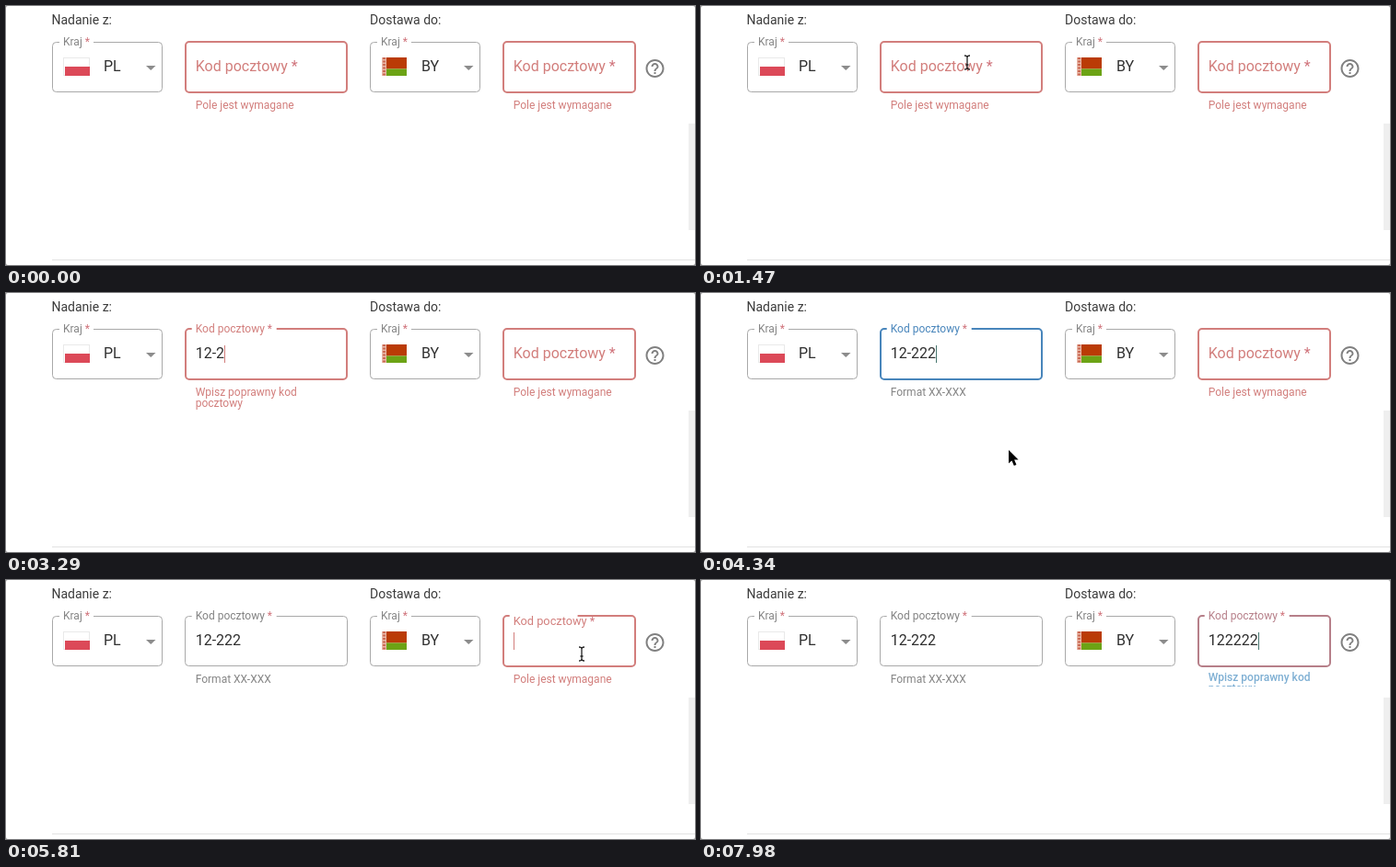
An HTML page for the animation above (8000 ms loop, 748 by 282 pixels).

```html
<!DOCTYPE html>
<html lang="pl">
<head>
<meta charset="utf-8">
<title>Kod pocztowy</title>
<style>
html, body { margin: 0; width: 100%; height: 100%; overflow: hidden; background: #999; }
svg { display: block; width: 748px; height: 282px; }
text { font-family: Roboto, Arial, sans-serif; white-space: pre; }
.heading { font-size: 14px; fill: #3c3c3c; }
.value { font-size: 16px; fill: #303030; }
.small { font-size: 12px; fill: #858585; }
.star { fill: #d0747c; }
.line { fill: none; stroke: #a9a9a9; }
</style>
</head>
<body>
<svg id="stage" viewBox="0 0 748 282">
  <defs><clipPath id="messageClip"><rect x="540" y="98" width="180" height="18"/></clipPath></defs>
  <rect width="748" height="282" rx="2" fill="#fff"/>
  <rect x="741" y="128" width="7" height="116" fill="#efefef"/>
  <rect x="50" y="276" width="698" height="1" fill="#e2e2e2"/>
  <text class="heading" x="49.5" y="20">Nadanie z:</text>
  <text class="heading" x="395" y="20">Dostawa do:</text>
  <g>
    <rect x="62.5" y="56.5" width="28" height="19" fill="#fff" stroke="#e9e9e9"/>
    <rect x="64" y="66" width="27" height="10" fill="#dc4958"/>
  </g>
  <g>
    <rect x="408" y="56" width="27" height="12.500" fill="#ba3b06"/>
    <rect x="408" y="68.500" width="27" height="7.500" fill="#6ca315"/>
    <rect x="408" y="56" width="5" height="20" fill="#e9b9a9"/>
    <path d="M410.500 56V76" stroke="#cb6a55" stroke-width="3" stroke-dasharray="2 1.500"/>
  </g>
  <path transform="translate(692.5 56)" fill="#808080" d="M11 18h2v-2h-2v2zm1-16C6.480 2 2 6.480 2 12s4.480 10 10 10 10-4.480 10-10S17.520 2 12 2zm0 18c-4.410 0-8-3.590-8-8s3.590-8 8-8 8 3.590 8 8-3.590 8-8 8zm0-14c-2.210 0-4 1.790-4 4h2c0-1.100.900-2 2-2s2 .900 2 2c0 2-3 1.750-3 5h2c0-2.250 3-2.500 3-5 0-2.210-1.790-4-4-4z"/>
</svg>
<script>
const LOOP = 8000;
const RED = [210, 126, 124], BLUE = [72, 133, 187], GRAY = [169, 169, 169], LABEL = [130, 130, 130];
const REQUIRED = ['Pole jest wymagane'];
const INVALID = ['Wpisz poprawny kod', 'pocztowy'];
const stage = document.getElementById('stage');

function add(tag, attrs = {}, parent = stage, content = '') {
  const node = document.createElementNS('http://www.w3.org/2000/svg', tag);
  set(node, attrs);
  node.textContent = content;
  parent.append(node);
  return node;
}
function set(node, attrs) {
  for (const key in attrs) node.setAttribute(key, attrs[key]);
}
const clamp = v => Math.min(1, Math.max(0, v));
const lerp = (a, b, p) => a + (b - a) * p;
const progress = (t, start, length) => clamp((t - start) / length);
const mix = (a, b, p) => a.map((v, i) => lerp(v, b[i], p));
const rgb = c => `rgb(${c.map(Math.round)})`;

// cubic-bezier(.25, .8, .25, 1)
function swift(x) {
  let lo = 0, hi = 1;
  for (let i = 0; i < 20; i++) {
    const u = (lo + hi) / 2;
    if (.75 * u * (1 - u) + u ** 3 < x) lo = u; else hi = u;
  }
  return 2.4 * lo * (1 - lo) ** 2 + 3 * lo * lo * (1 - lo) + lo ** 3;
}

// Rounded box whose top edge is open between x = from and x = to
function outline(l, t, r, b, from, to) {
  return `M${to} ${t}H${r - 4}a4 4 0 0 1 4 4V${b - 4}a4 4 0 0 1-4 4H${l + 4}` +
    `a4 4 0 0 1-4-4V${t + 4}a4 4 0 0 1 4-4H${from}`;
}

function addLabel(text, attrs) {
  const label = add('text', attrs, stage, text + ' ');
  add('tspan', { class: 'star' }, label, '*');
  return label;
}

function addCountry(x, code) {
  add('path', { class: 'line', d: outline(x + .5, 39.5, x + 119.5, 93.5, x + 8, x + 45) });
  addLabel('Kraj', { class: 'small', x: x + 12, y: 43 });
  add('text', { class: 'value', x: x + 56, y: 71 }, stage, code);
  add('path', { d: `M${x + 102} 65h10.500l-5.250 5z`, fill: '#8c8c8c' });
}

function addField(spec) {
  const textX = spec.x + 11.7;
  return {
    ...spec, textX,
    box: add('path', { fill: 'none' }),
    label: addLabel('Kod pocztowy', { 'font-size': 16 }),
    star: null,
    value: add('text', { class: 'value', x: textX, y: 71 }),
    caret: add('rect', { y: 57, width: 1, height: 19 }),
    lines: [112, 124].map(y => add('text', { class: 'small', x: textX, y }, add('g')))
  };
}

function drawField(f, t) {
  const up = swift(progress(t, f.focus, 400));
  const valid = progress(t, f.valid, 350);
  const left = progress(t, f.blur, 300);
  const border = mix(mix(RED, BLUE, valid), GRAY, left);
  const labelColor = mix(mix(RED, BLUE, valid), LABEL, progress(t, f.blur, 70));
  const thick = lerp(2, 1, left), inset = (2 - thick) / 2;
  const gap = f.textX - 4;

  set(f.box, {
    d: outline(f.x + 1 - inset, 39 + inset, f.x + f.width - 1 + inset, 94 - inset, gap, gap + 92 * up),
    stroke: rgb(border), 'stroke-width': thick
  });
  set(f.label, {
    transform: `translate(${f.textX} ${lerp(71, 43, up)}) scale(${lerp(1, .75, up)})`,
    fill: rgb(labelColor)
  });

  const typed = f.keys.filter(k => t >= k[0]).pop();
  f.value.textContent = typed ? typed[1] : '';
  const since = t - (typed ? typed[0] : f.focus);
  const shown = t >= f.focus && t < f.blur && Math.floor(since / 510) % 2 === 0;
  set(f.caret, {
    x: Math.round(f.textX + (typed ? f.value.getComputedTextLength() : 0)),
    fill: t >= f.valid ? '#47766f' : rgb(RED),
    visibility: shown ? 'visible' : 'hidden'
  });
  drawMessage(f, t);
}

function drawMessage(f, t) {
  let text = t < f.keys[0][0] ? REQUIRED : INVALID;
  let color = rgb(RED), shift = 0, opacity = 1, clip = 'none';
  if (t >= f.hintAt) {
    if (f.hint) {
      const p = progress(t, f.hintAt, 300);
      text = [f.hint];
      color = '#858585';
      shift = -5 * (1 - p);
      opacity = .2 + .8 * p;
    } else {
      color = '#7eafd3';
      shift = -2.5;
      clip = 'url(#messageClip)';
    }
  }
  f.lines.forEach((line, i) => {
    line.textContent = text[i] || '';
    line.style.fill = color;
    set(line, { y: 112 + 12 * i + shift, opacity, 'font-weight': clip === 'none' ? 400 : 500 });
    set(line.parentNode, { 'clip-path': clip });
  });
}

addCountry(50, 'PL');
addCountry(395, 'BY');
const fields = [
  addField({
    x: 194, width: 177, focus: 1570, valid: 3990, blur: 4550, hintAt: 3990, hint: 'Format XX-XXX',
    keys: [[2730, '1'], [2940, '12-'], [3220, '12-2'], [3570, '12-22'], [3990, '12-222']]
  }),
  addField({
    x: 539, width: 145, focus: 5685, valid: 7910, blur: LOOP, hintAt: 7950,
    keys: [[6160, '1'], [6720, '12'], [6930, '122'], [7140, '1222'], [7490, '12222'], [7910, '122222']]
  })
];

// Pointer trips: [time, x, y]; hidden between trips
const trips = [
  [[70, 531, 228], [350, 370, 140], [700, 295, 82], [840, 292, 69], [1190, 289, 61.5], [2730, 289, 61.5]],
  [[4060, 296, 76], [4200, 325, 150], [4340, 334, 171], [4480, 337, 175], [4620, 334, 171],
   [4760, 333, 169], [4900, 312, 129], [5200, 312, 129], [5400, 430, 116], [5600, 590, 88],
   [5740, 625, 80.5], [6160, 625, 80.5]]
];
const pointer = add('g');
const arrow = add('path', {
  d: 'M0 0V14.500L3.400 11.400 5.800 17l2.600-1.100L6.100 10.500H10.500Z',
  fill: '#000', stroke: '#fff', 'stroke-width': 1, 'paint-order': 'stroke'
}, pointer);
const beam = add('path', {
  d: 'M-3-7.500Q0-7.500 0-5.500Q0-7.500 3-7.500M0-5.500V5.500M-3 7.500Q0 7.500 0 5.500Q0 7.500 3 7.500M-1.500 2.500H1.500',
  fill: 'none', stroke: '#222', 'stroke-width': 1.3
}, pointer);

function drawPointer(t) {
  const trip = trips.find(p => t >= p[0][0] && t < p[p.length - 1][0]);
  pointer.style.display = trip ? '' : 'none';
  if (!trip) return;
  const i = trip.findIndex(p => p[0] > t);
  const [a, b] = [trip[i - 1], trip[i]];
  const p = progress(t, a[0], b[0] - a[0]);
  const x = lerp(a[1], b[1], p), y = lerp(a[2], b[2], p);
  const typing = y < 81.5 && fields.some(f => x > f.x && x < f.x + f.width);
  set(pointer, { transform: `translate(${x} ${y})` });
  arrow.style.display = typing ? 'none' : '';
  beam.style.display = typing ? '' : 'none';
}

const start = performance.now();
function frame() {
  const t = (performance.now() - start) % LOOP;
  fields.forEach(f => drawField(f, t));
  drawPointer(t);
  requestAnimationFrame(frame);
}
frame();
</script>
</body>
</html>
```
